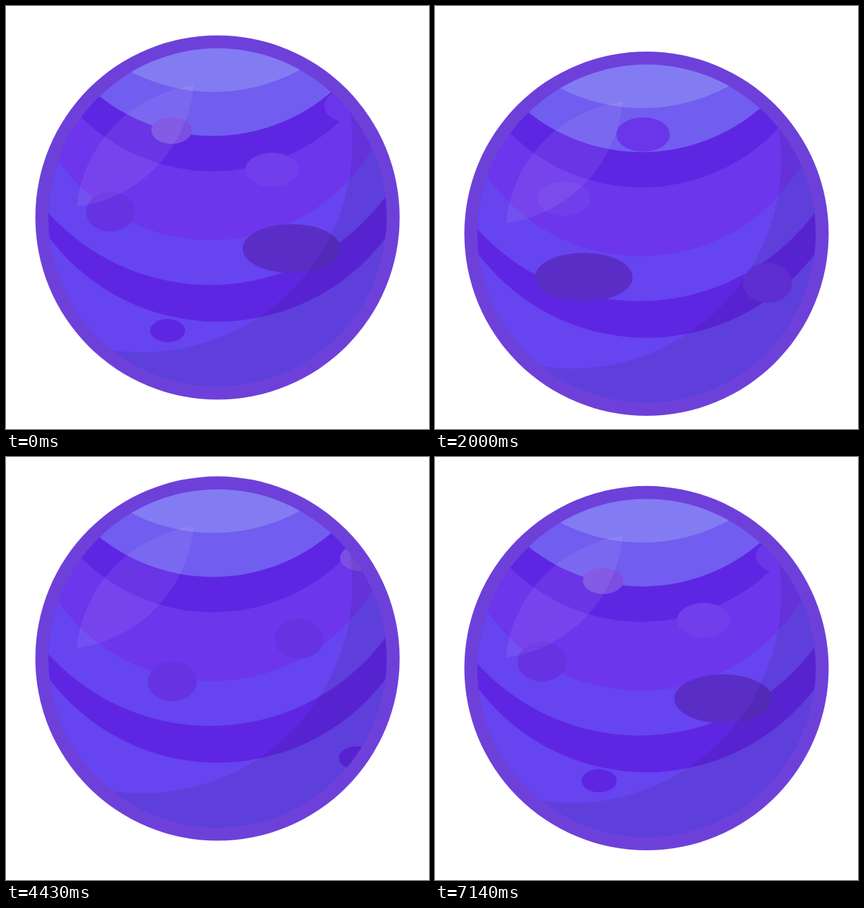
Animation of 640 by 640 pixels, one loop 7210 ms. Source, as an HTML page:

```html
<!DOCTYPE html>
<html lang="en">
<head>
<meta charset="utf-8">
<title>Violet planet</title>
<style>
  html, body { margin: 0; width: 100%; height: 100%; overflow: hidden; background: #fff; }
  svg { display: block; width: 100vw; height: 100vh; }
</style>
</head>
<body>
<svg viewBox="0 0 640 640">
  <defs>
    <clipPath id="disc"><circle cx="320" cy="320" r="256"/></clipPath>
  </defs>
  <g id="planet">
    <circle cx="320" cy="320" r="275.6" fill="#6e40da"/>
    <g clip-path="url(#disc)">
      <g id="bands"></g>
      <g id="craters">
        <g id="spots"></g>
        <use href="#spots" x="744"/>
      </g>
      <!-- shade: everything outside a large offset circle -->
      <path d="M0 0H640V640H0ZM-110 207a317 317 0 1 0 634 0a317 317 0 1 0 -634 0Z"
            fill="#000" fill-opacity=".08" fill-rule="evenodd"/>
      <path d="M284 120A206 206 0 0 0 107 304A204 204 0 0 0 284 120Z" fill="#fff" fill-opacity=".07"/>
    </g>
  </g>
</svg>
<script>
const LOOP = 7210, PERIOD = 7180, FPS = 14, BOB = 25.2;
const byId = id => document.getElementById(id);

function add(parent, tag, attrs) {
  const el = document.createElementNS('http://www.w3.org/2000/svg', tag);
  for (const name in attrs) el.setAttribute(name, attrs[name]);
  parent.append(el);
}

// Bands, lowest first: centre x, bottom y, radius, colour
const BANDS = [
  [320, 320 + 300, 300, '#6644ef'],
  [320, 477.5, 319, '#5e26e3'],
  [309, 422, 330, '#6644ef'],
  [311, 354, 284, '#6d35ec'],
  [313, 250, 282.5, '#5e26e3'],
  [313, 196.5, 275, '#715def'],
  [314, 130, 272, '#837bf1']
];
for (const [cx, bottom, r, fill] of BANDS) add(byId('bands'), 'circle', { cx, cy: bottom - r, r, fill });

// Craters: centre, radii, colour
const CRATERS = [
  [432, 367, 74, 37, '#5a2dc7'],
  [402.5, 248, 40.5, 26, '#703eea'],
  [522, 151, 40.5, 26, '#6b36e9'],
  [250.5, 188.5, 30.5, 20, '#7b4fe2'],
  [158, 311, 37, 30, '#6632e2'],
  [710, 375.5, 37, 30, '#6632e2'],
  [244.5, 491, 26.5, 17.5, '#5e26e3']
];
for (const [cx, cy, rx, ry, fill] of CRATERS) add(byId('spots'), 'ellipse', { cx, cy, rx, ry, fill });

// Crater drift inside the planet: time, x, y
const DRIFT = [
  [0, 0, 0], [1214, -128.2, 18], [1640, -170.5, 20.5], [2000, -207, 19],
  [3143, -327, 1.9], [4429, -458.5, -20.7], [5150, -533, -24.3],
  [5999, -620.5, -19], [7180, -744, 0]
];

// Knot by index, continued past both ends of the loop
function knot(i) {
  const n = DRIFT.length - 1, turns = Math.floor(i / n);
  const [t, x, y] = DRIFT[i - turns * n];
  return [t + turns * PERIOD, x - turns * 744, y];
}

// Smooth curve through the knots
function drift(t, axis) {
  let i = 0;
  while (i < DRIFT.length - 2 && t >= DRIFT[i + 1][0]) i++;
  const [a, b, c, d] = [i - 1, i, i + 1, i + 2].map(knot);
  const span = c[0] - b[0], u = (t - b[0]) / span;
  const m0 = (c[axis] - a[axis]) / (c[0] - a[0]) * span;
  const m1 = (d[axis] - b[axis]) / (d[0] - b[0]) * span;
  const u2 = u * u, u3 = u2 * u;
  return (2 * u3 - 3 * u2 + 1) * b[axis] + (u3 - 2 * u2 + u) * m0
       + (3 * u2 - 2 * u3) * c[axis] + (u3 - u2) * m1;
}

// cubic-bezier(1/6, 1/6, 2/3, 1)
function easeOut(x) {
  let low = 0, high = 1, s;
  for (let i = 0; i < 24; i++) {
    s = (low + high) / 2;
    if (s / 2 + s * s - s ** 3 / 2 < x) low = s; else high = s;
  }
  return s / 2 + 2 * s * s - 1.5 * s ** 3;
}

function bob(t) {
  const quarters = t / PERIOD * 4, half = quarters % 2;
  const sign = quarters < 2 ? 1 : -1;
  return sign * BOB * easeOut(half < 1 ? half : 2 - half);
}

const planet = byId('planet'), craters = byId('craters');
let start;

function draw(now) {
  start ??= now;
  const time = (now - start) % LOOP;
  const step = Math.min(100, Math.floor((time + 5) * FPS / 1000));
  const t = step * 1000 / FPS;
  planet.setAttribute('transform', `translate(0 ${bob(t)})`);
  craters.setAttribute('transform', `translate(${drift(t, 1)} ${drift(t, 2)})`);
  requestAnimationFrame(draw);
}
draw(performance.now());
</script>
</body>
</html>
```
